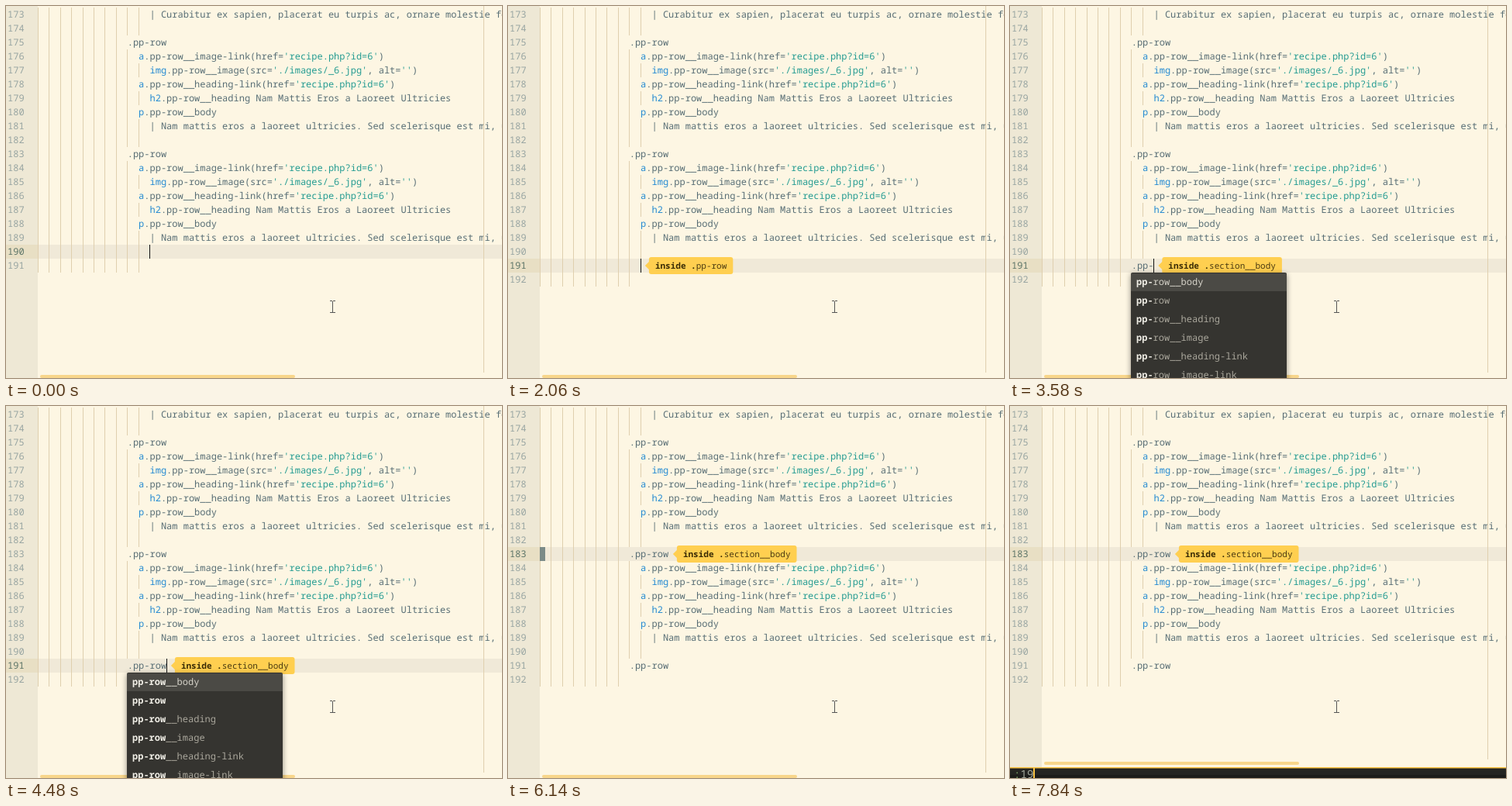
These frames come from a looping animation (640 by 480 pixels, 8000 ms). An HTML page with a canvas:

```html
<!DOCTYPE html>
<html lang="en">
<head>
<meta charset="utf-8">
<title>Editor</title>
<style>
html, body { margin: 0; width: 100%; height: 100%; overflow: hidden; background: #fdf6e3; }
canvas { display: block; width: 640px; height: 480px; }
</style>
</head>
<body>
<canvas id="stage" width="640" height="480"></canvas>
<script>
const ctx = document.getElementById('stage').getContext('2d');
ctx.textRendering = 'geometricPrecision';

const LOOP = 8000, CHAR = 7.2, LEFT = 41.5, ROW = 18, FIRST = 173;
const INK = '#586e75', BLUE = '#268bd2', TEAL = '#259c92', YELLOW = '#ffcf50';
const rowTop = n => 2 + (n - FIRST) * ROW;
const colX = c => LEFT + c * CHAR;
const within = (t, spans) => spans.some(([a, b]) => t >= a && t < b);
const latest = (t, steps) => steps.filter(s => s[0] <= t).pop()[1];

const item = [
  [16, '.pp-row'],
  [18, "a.pp-row__image-link(href='recipe.php?id=6')"],
  [20, "img.pp-row__image(src='./images/_6.jpg', alt='')"],
  [18, "a.pp-row__heading-link(href='recipe.php?id=6')"],
  [20, 'h2.pp-row__heading Nam Mattis Eros a Laoreet Ultricies'],
  [18, 'p.pp-row__body'],
  [20, '| Nam mattis eros a laoreet ultricies. Sed scelerisque est mi, ut'],
  [20, '']
];
const lines = [
  [20, '| Curabitur ex sapien, placerat eu turpis ac, ornare molestie felis'],
  [20, ''], ...item, ...item
];
const choices = ['__body', '', '__heading', '__image', '__heading-link', '__image-link'];

const indents = [[0, 20], [2000, 18], [2680, 16]];
const typing = [[0, ''], [3000, '.'], [3160, '.p'], [3200, '.pp'], [3540, '.pp-'],
  [3600, '.pp-r'], [3660, '.pp-ro'], [3720, '.pp-row']];
const command = [[0, ':'], [5880, ':1'], [5900, ':18'], [5920, ':183'], [7840, ':19']];
const caretOff = [[20, 320], [740, 760], [1180, 1480], [2480, 2680], [4180, 4480], [5580, 5880]];

function box(x, y, w, h, color, radius = 0) {
  ctx.fillStyle = color;
  ctx.beginPath();
  ctx.roundRect(x, y, w, h, radius);
  ctx.fill();
}

function text(str, x, y, color, size = 12, weight = 400) {
  ctx.font = `${weight} ${size}px "Noto Sans Mono", "DejaVu Sans Mono", monospace`;
  ctx.fillStyle = color;
  ctx.fillText(str, x, y);
  return x + ctx.measureText(str).width;
}

function codeLine(n, [indent, code]) {
  const y = rowTop(n);
  for (let i = 0; i < indent / 2; i++) {
    box(Math.round(41 + i * 2 * CHAR), y, 1, ROW, '#dfcfae');
  }
  let col = indent;
  for (const part of code.split(/(^(?:a|img|h2|p)(?=\.)|'[^']*')/)) {
    if (!part) continue;
    const color = part[0] === "'" ? TEAL : /^(a|img|h2|p)$/.test(part) ? BLUE : INK;
    text(part, colX(col), y + 13, color);
    col += part.length;
  }
}

function badge(x, y, owner) {
  const left = x + 10.8, mid = y + 9;
  ctx.font = '11px "Noto Sans Mono", "DejaVu Sans Mono", monospace';
  const width = ctx.measureText('inside ' + owner).width + 16;
  box(left, y - 2, width, 22, YELLOW, 3);
  ctx.beginPath();
  ctx.moveTo(left - 5, mid);
  ctx.lineTo(left + 1, mid - 6);
  ctx.lineTo(left + 1, mid + 6);
  ctx.fill();
  const dot = owner.indexOf('.') + 1;
  const end = text('inside ' + owner.slice(0, dot), left + 8, y + 13, '#3a2c05', 11, 700);
  text(owner.slice(dot), end, y + 13, '#4a3a10', 11);
}

function popup(match) {
  ctx.save();
  ctx.shadowColor = 'rgba(0,0,0,.45)';
  ctx.shadowBlur = 7;
  ctx.shadowOffsetY = 2;
  box(156, 344, 201, 150, '#353430', 2);
  ctx.restore();
  box(156, 345, 201, 23, '#4b4a45');
  choices.forEach((suffix, i) => {
    const y = 360 + i * 24;
    const x = text(match, 163, y, '#f0eee6', 12, 700);
    text(('pp-row' + suffix).slice(match.length), x, y, i ? '#aaa79c' : '#d5d2c8');
  });
}

function panel(cmd, caretOn) {
  box(0, 466, 640, 14, '#242422');
  box(0, 476, 640, 4, '#1c1c1a');
  box(0, 466, 640, 1.5, '#fcc544');
  text(':', 5, 480, '#74995f', 14);
  const x = text(cmd.slice(1), 13.5, 480, '#a3a89c', 14);
  if (caretOn) box(Math.round(x - .4), 467, 2, 13, '#fcc544');
}

function mousePointer() {
  box(421, 381, 1, 15, '#555');
  for (const y of [380, 395]) {
    box(418, y, 3, 1, '#555');
    box(422, y, 3, 1, '#555');
  }
}

function draw(t) {
  const indent = latest(t, indents), typed = latest(t, typing);
  const col = indent + typed.length;
  const selecting = within(t, [[6560, 7720]]);
  const panelOpen = within(t, [[5280, 6140], [7840, LOOP]]);
  const caretOn = !within(t, caretOff);
  const row = t < 740 ? 190 : t < 6140 ? 191 : 183;
  const head = selecting ? row + Math.min(6, Math.floor((t - 6560) / 100)) : row;
  const y = rowTop(row);

  box(0, 0, 640, 480, '#fdf6e3');
  box(0, 0, 41, 480, '#eee8d5');
  box(0, y, 41, ROW, '#e8dfc4');
  if (selecting) box(41, y, 599, (head - row + 1) * ROW, '#ebe3cb');
  else box(41, y, 599, ROW, '#f0e9d8');

  const shown = [...lines, [indent, typed]];
  if (t >= 740) shown.push([indent, '']);
  shown.forEach((line, i) => {
    const n = FIRST + i;
    const lit = n >= row && n <= (selecting ? head + 1 : row);
    codeLine(n, line);
    text(n, 2, rowTop(n) + 13, lit ? '#5d7568' : '#98a5a2');
  });
  box(616, 0, 1, panelOpen ? 456 : 473, '#dfcfae');
  box(44, panelOpen ? 459 : 476, 329, 4, '#f8d68b', 2);

  if (t < 4780) {
    if (caretOn) box(Math.floor(colX(col)), y, 1, ROW, '#111');
  } else if (!panelOpen) {
    const onLetter = t < 4980;
    box(onLetter ? colX(22) : 41, rowTop(head), 7, ROW, '#7b8b88');
    if (onLetter) text('w', colX(22), y + 13, '#fdf6e3');
  }

  if (t >= 1680 && !selecting) {
    const owner = { 20: 'p.pp-row__body', 18: '.pp-row', 16: '.section__body' }[indent];
    badge(colX(col), y, owner);
  }
  if (within(t, [[3520, 4780]])) popup(typed.slice(1));
  mousePointer();
  if (panelOpen) panel(latest(t, command), caretOn);
}

function frame() {
  draw(performance.now() % LOOP);
  requestAnimationFrame(frame);
}
frame();
</script>
</body>
</html>
```
